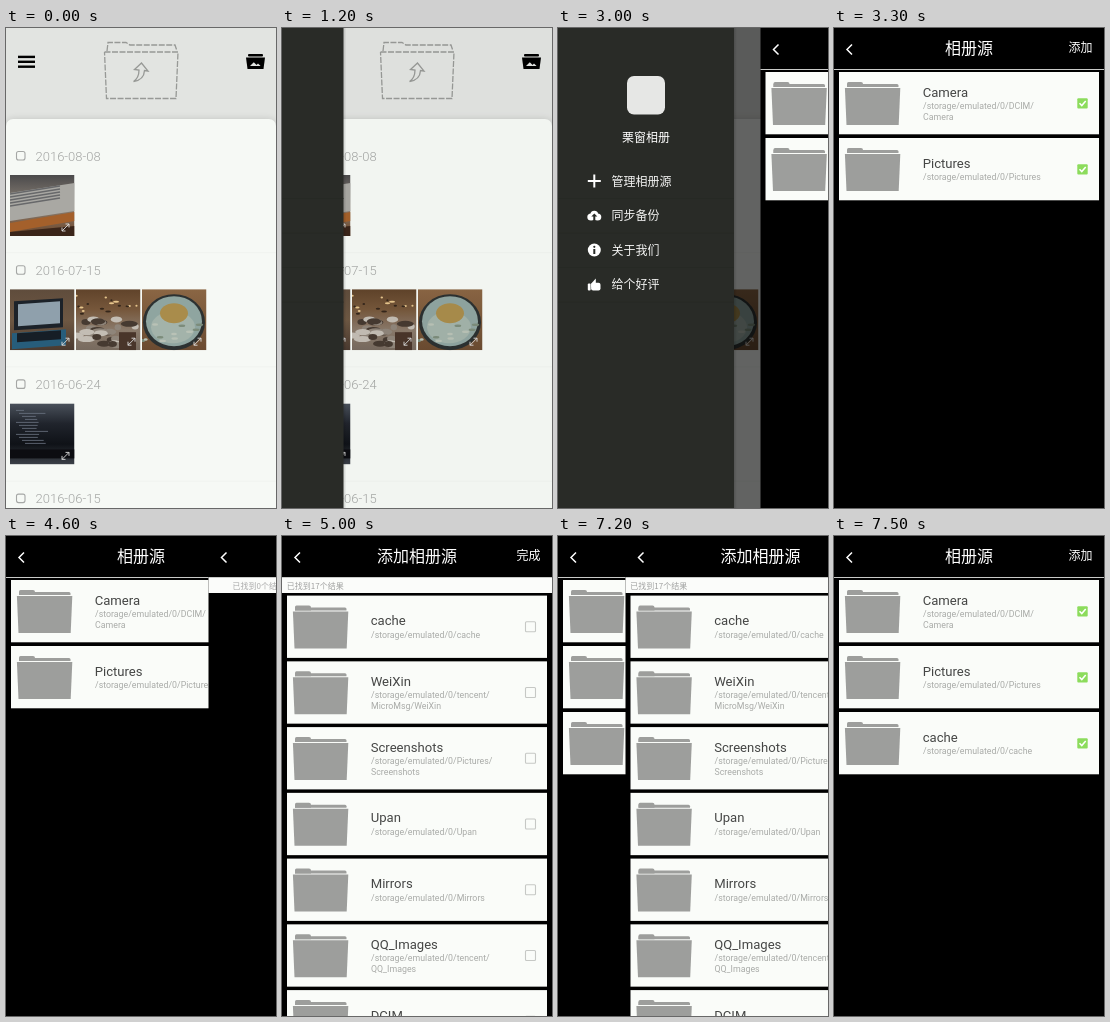
An HTML page with a canvas for the animation above (8 s loop, 270 by 480 pixels).

```html
<!DOCTYPE html>
<html lang="zh-CN">
<head>
<meta charset="utf-8">
<title>Album sources</title>
<style>
html, body { margin: 0; width: 100%; height: 100%; overflow: hidden; background: #000; }
canvas { display: block; width: 270px; height: 480px; }
</style>
</head>
<body>
<canvas id="stage"></canvas>
<script>
const W = 270, H = 480, LOOP = 8000, TICK = 100;
const canvas = document.getElementById('stage');
const c = canvas.getContext('2d');
const dpr = Math.max(1, window.devicePixelRatio || 1);
canvas.width = W * dpr;
canvas.height = H * dpr;

const LATIN = 'Roboto, "Noto Sans", sans-serif';
const HAN = '"Noto Sans CJK SC", "Noto Sans CJK", sans-serif';
const DARK = '#292b27', WHITE = '#fff';

const span = (t, a, b) => Math.min(1, Math.max(0, (t - a) / (b - a)));

function seeded(seed) {
  return () => (seed = (seed * 16807) % 2147483647) / 2147483647;
}
function at(x, y, paint) {
  c.save();
  c.translate(x, y);
  paint();
  c.restore();
}
function rect(x, y, w, h, color) {
  c.fillStyle = color;
  c.fillRect(x, y, w, h);
}
function pill(x, y, w, h, r, color) {
  c.beginPath();
  c.roundRect(x, y, w, h, r);
  c.fillStyle = color;
  c.fill();
}
function box(x, y, size, r, color) {
  c.beginPath();
  c.roundRect(x, y, size, size, r);
  c.strokeStyle = color;
  c.lineWidth = 1.1;
  c.stroke();
}
function oval(x, y, rx, ry, color) {
  c.beginPath();
  c.ellipse(x, y, rx, ry, 0, 0, Math.PI * 2);
  c.fillStyle = color;
  c.fill();
}
function trace(pts) {
  c.beginPath();
  pts.forEach(([x, y]) => c.lineTo(x, y));
}
function line(color, width, ...pts) {
  trace(pts);
  c.strokeStyle = color;
  c.lineWidth = width;
  c.stroke();
}
function poly(color, ...pts) {
  trace(pts);
  c.fillStyle = color;
  c.fill();
}
// Corners of a box whose bottom edge is narrower by `inset` on each side
const taper = (x, y, w, h, inset) =>
  [[x, y], [x + w, y], [x + w - inset, y + h], [x + inset, y + h]];
// Corners of a box whose right side is raised
const slab = (x, y, w, h, rise) =>
  [[x, y], [x + w, y - rise], [x + w, y + h - rise], [x, y + h]];
const peak = (x, y, r) => [[x - r, y], [x, y - r], [x + r, y]];

function fade(x0, y0, x1, y1, ...colors) {
  const g = c.createLinearGradient(x0, y0, x1, y1);
  colors.forEach((color, i) => g.addColorStop(i / (colors.length - 1), color));
  return g;
}
function text(s, x, y, size, color, family = LATIN, align = 'left', weight = 400) {
  c.font = `${weight} ${size}px ${family}`;
  c.textAlign = align;
  c.fillStyle = color;
  c.fillText(s, x, y);
}

// Simplified photos
const PW = 64.5, PH = 61;
const backdrop = (...colors) => rect(0, 0, PW, PH, fade(0, 0, 0, PH, ...colors));
function specks(seed, n, y, h, size, ...colors) {
  const rnd = seeded(seed);
  for (let i = 0; i < n; i++) {
    oval(rnd() * PW, y + rnd() * h, size * (0.5 + rnd()), size / 2, colors[i % colors.length]);
  }
}
function silverLaptop() {
  backdrop('#4b4a4b', '#8d8378', '#6b4325');
  poly('#a9a8a3', ...slab(0, 18, PW, 28, 10));
  for (let i = 0; i < 5; i++) line('#67686a', 1.6, [0, 19 + i * 3], [50, 11 + i * 3]);
  poly('#a4602b', ...slab(0, 48, PW, 9, 11));
  poly('#3a2519', ...slab(0, 57, PW, 20, 6));
}
function blueLaptop() {
  backdrop('#5f4c3c', '#6e5843', '#4a3a30');
  poly('#1c2229', ...slab(4, 12, 49, 29, 3));
  poly('#8fa0ac', ...slab(8, 15, 42, 22, 3));
  poly('#275d7b', ...slab(2, 44, 54, 16, 4));
  poly('#161e26', ...slab(7, 44, 44, 9, 3));
}
function cafe() {
  backdrop('#60432a', '#76573b', '#8a7a6b', '#776a5e');
  specks(23, 16, 6, 20, 2, '#e6c58c', '#35271b');
  specks(5, 32, 28, 28, 6, '#c3bdb4', '#463a31', '#8f857a');
  rect(43, 43, 17, 18, '#49352a');
}
function soup() {
  backdrop('#8a6644', '#6b4b31');
  oval(32, 33, 31, 28, '#2c3131');
  oval(32, 32, 28, 25, '#8fa5a0');
  oval(31, 38, 22, 16, '#a3b3aa');
  oval(32, 24, 14, 10, '#a98c4b');
  specks(91, 12, 34, 18, 2.5, '#7c8c7b', '#b9c2b6');
}
function codeScreen() {
  backdrop('#4a515b', '#20242c', '#0f1217', '#3b4048');
  const rnd = seeded(7);
  for (let i = 0; i < 12; i++) {
    const x = 6 + (i % 4) * 3, y = 7 + i * 3;
    line('#6c7482', 0.8, [x, y], [x + 8 + rnd() * 20, y]);
  }
  rect(0, 46, PW, 9, '#0c0d11');
}
function photo(x, y, paint) {
  at(x, y, () => {
    c.beginPath();
    c.rect(0, 0, PW, PH);
    c.clip();
    paint();
    line('#ddd', 0.9, [52, 56], [59, 49]);
    line('#ddd', 0.9, [55.5, 49], [59, 49], [59, 52.5]);
    line('#ddd', 0.9, [52, 52.5], [52, 56], [55.5, 56]);
  });
}

const days = [
  ['2016-08-08', silverLaptop],
  ['2016-07-15', blueLaptop, cafe, soup],
  ['2016-06-24', codeScreen],
  ['2016-06-15']
];

function dropFolder() {
  const ink = '#979996', body = taper(98.5, 24, 73.5, 46.5, 2);
  c.setLineDash([6, 1.5]);
  line(ink, 1.3, [101, 23], [102, 14.5], [120, 14.5], [124, 17], [169, 17], [171, 23]);
  line(ink, 1.3, ...body, body[0]);
  c.setLineDash([]);
  c.beginPath();
  c.moveTo(127.5, 53.5);
  c.quadraticCurveTo(133, 50, 133, 42);
  [[128.5, 41.5], [135.5, 35], [142, 43], [138.5, 42.5]].forEach(p => c.lineTo(...p));
  c.quadraticCurveTo(138, 52, 127.5, 53.5);
  c.stroke();
}
function gallery() {
  const sky = '#e2e4e1';
  rect(0, 0, W, H, sky);
  for (let i = 0; i < 3; i++) rect(12, 27.7 + i * 4.9, 17, 2.4, '#000');
  dropFolder();
  pill(242, 26, 15, 2.4, 1, '#000');
  poly('#000', ...taper(240, 29.5, 19, 11.5, 1.5));
  poly(sky, ...peak(247.8, 38, 3.8));
  poly(sky, ...peak(252, 38, 2.6));

  c.save();
  c.shadowColor = 'rgba(0,0,0,.14)';
  c.shadowBlur = 7 * dpr;
  pill(0, 91, W, 400, 7, '#f6f9f5');
  c.restore();
  days.forEach(([date, ...shots], i) => {
    const y = 128 + i * 114.2;
    if (i) rect(0, y - 18, W, 1, '#f0f3ef');
    box(10.5, y - 4.5, 8.5, 2, '#a5a7a5');
    text(date, 29.5, y + 4.5, 13, '#a3a5a3', LATIN, 'left', 300);
    shots.forEach((paint, k) => photo(4 + k * 66, y + 19, paint));
  });
}

function plusIcon() {
  rect(-6.5, -1, 13, 2, WHITE);
  rect(-1, -6.5, 2, 13, WHITE);
}
function cloudIcon() {
  for (let i = -1; i < 2; i++) oval(i * 3.2, Math.abs(i) * 2.8 - 1.2, 3.8, 3.5, WHITE);
  poly(DARK, ...peak(0, 1, 3));
  rect(-1, 0, 2, 5, DARK);
}
function infoIcon() {
  oval(0, 0, 6.5, 6.5, WHITE);
  rect(-1, -1, 2, 5, DARK);
  oval(0, -3.2, 1.1, 1.1, DARK);
}
function thumbIcon() {
  pill(-6.5, -1, 2.8, 7, 1, WHITE);
  pill(-3.2, -1.8, 9.4, 7.8, 2, WHITE);
  poly(WHITE, ...slab(-3, -1, 4.5, 4, 5));
}
const menu = [
  ['管理相册源', plusIcon], ['同步备份', cloudIcon],
  ['关于我们', infoIcon], ['给个好评', thumbIcon]
];

function drawer(open, glow) {
  const w = 176;
  at(w * (open - 1), 0, () => {
    rect(w, 0, 3, H, fade(w, 0, w + 3, 0, 'rgba(0,0,0,.15)', 'rgba(0,0,0,0)'));
    rect(0, 0, w, H, DARK);
    pill(69, 48, 38, 38.5, 7, '#e6e7e5');
    text('栗窗相册', 88, 114.3, 12, WHITE, HAN, 'center');
    rect(0, 136, w, 34.5, `rgba(255,255,255,${0.07 * glow})`);
    menu.forEach(([label, icon], i) => {
      const y = 153 + i * 34.5;
      rect(0, y + 17.2, w, 0.8, '#262824');
      at(36.3, y, icon);
      text(label, 53.5, y + 4.5, 12, '#f4f4f3', HAN);
    });
  });
}

const root = '/storage/emulated/0/';
const chosen = [
  ['Camera', root + 'DCIM/', 'Camera'],
  ['Pictures', root + 'Pictures'],
  ['cache', root + 'cache']
];
const found = [
  ['cache', root + 'cache'],
  ['WeiXin', root + 'tencent/', 'MicroMsg/WeiXin'],
  ['Screenshots', root + 'Pictures/', 'Screenshots'],
  ['Upan', root + 'Upan'],
  ['Mirrors', root + 'Mirrors'],
  ['QQ_Images', root + 'tencent/', 'QQ_Images'],
  ['DCIM', root + 'DCIM']
];

function folder(y) {
  const gray = '#9d9e9c';
  pill(13, y + 10, 16, 5, [1.5, 2, 0, 0], gray);
  pill(13, y + 12, 51.5, 3, [0, 1.5, 0, 0], gray);
  poly(gray, ...taper(10.9, y + 16, 55.4, 37, 1.6));
}
function checkbox(y, on) {
  if (!on) return box(243.5, y - 5, 10, 1, '#c6c8c5');
  pill(243.3, y - 5, 10.4, 10.4, 1, '#8cdc5c');
  line(WHITE, 1.5, [245.5, y], [247.8, y + 2.4], [251.7, y - 2.2]);
}
function row(y, [name, path, rest], checked, glow = 0) {
  rect(5, y, 260, 62.3, '#fafcf9');
  if (glow) {
    c.globalAlpha = glow;
    rect(5, y, 260, 62.3, fade(5, y, 265, y + 30, '#c4ecb5', '#d6f3ca'));
    c.globalAlpha = 1;
  }
  folder(y);
  const base = y + (rest ? 24.5 : 29.5);
  text(name, 88.7, base, 13.1, '#454645');
  text(path, 89, base + 12.5, 8.8, '#a9aba8');
  if (rest) text(rest, 89, base + 23, 8.8, '#a9aba8');
  checkbox(y + 31.2, checked);
}
function page(x, title, action, body) {
  at(x, 0, () => {
    rect(0, 0, W, H, '#000');
    line(WHITE, 1.5, [18, 16.5], [13, 21.5], [18, 26.5]);
    text(title, W / 2, 26, 16, WHITE, HAN, 'center');
    text(action, 258.5, 24.4, 12, WHITE, HAN, 'right');
    rect(0, 41, W, 1, '#c9cac8');
    body();
  });
}
function sourcesPage(x, count) {
  page(x, '相册源', '添加', () => {
    chosen.slice(0, count).forEach((item, i) => row(44 + i * 66, item, true));
  });
}
function addPage(x, loaded, picked, glow) {
  page(x, '添加相册源', '完成', () => {
    rect(0, 42, W, 15, '#fbfcfa');
    if (!loaded) return text('已找到0个结果', 24, 52.5, 8, '#aaa', HAN);
    text('已找到17个结果', 4.8, 52.5, 8, '#a0a1a0', HAN);
    found.forEach((item, i) => row(59.6 + i * 65.75, item, !i && picked, i ? 0 : glow));
  });
}

function draw(now) {
  const t = Math.floor((now % LOOP) / TICK) * TICK;
  c.setTransform(dpr, 0, 0, dpr, 0, 0);

  if (t < 3300) {
    gallery();
    const open = 1 - Math.pow(1 - span(t, 1100, 1700), 2.36);
    if (open > 0) {
      rect(0, 0, W, H, `rgba(0,0,0,${0.6 * span(t, 1190, 1600)})`);
      drawer(open, t < 1700 ? 0 : 1 - span(t, 2400, 2700));
    }
  }
  const sourcesX = W * (1 - span(t, 2900, 3300));
  if (sourcesX < W) sourcesPage(sourcesX, t < 7000 ? 2 : 3);

  const addX = W * (1 - span(t, 4500, 4900) + span(t, 7100, 7500));
  if (addX < W) {
    const glow = t < 6200 ? 0 : 1 - span(t, 6200, 6700);
    addPage(addX, t >= 5000, t >= 6400, glow);
  }
  requestAnimationFrame(() => draw(performance.now()));
}
draw(performance.now());
</script>
</body>
</html>
```
